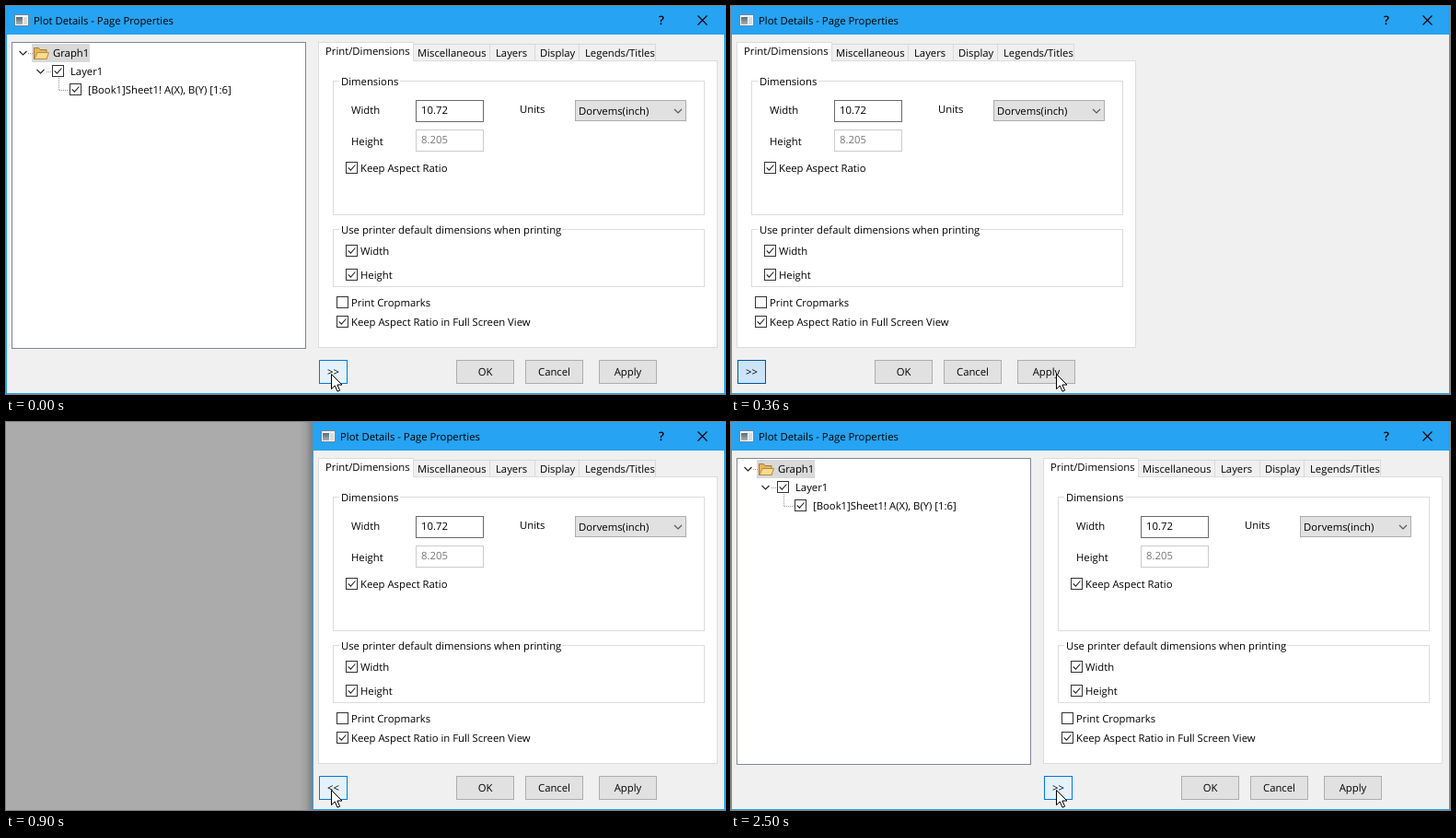
Write an HTML page that moves like this. It is 781 by 421 pixels and loops after 2.52 s.

```html
<!DOCTYPE html>
<html lang="en">
<head>
<meta charset="utf-8">
<title>Plot Details</title>
<style>
html, body { margin: 0; width: 100%; height: 100%; overflow: hidden; background: #ababab; }
svg { display: block; }
rect { shape-rendering: crispEdges; }
text { font: 11.3px "Open Sans", "Noto Sans", sans-serif; text-rendering: geometricPrecision; fill: #000; }
.mid { text-anchor: middle; }
.line { fill: none; stroke: #222; stroke-width: 1.1; }
</style>
</head>
<body>
<svg width="781" height="421" viewBox="0 0 781 421">
  <defs>
    <linearGradient id="shade"><stop offset="0" stop-opacity="0"/><stop offset=".5" stop-opacity=".06"/><stop offset="1" stop-opacity=".26"/></linearGradient>
    <linearGradient id="pane" x2="0" y2="1"><stop stop-color="#5d6b76"/><stop offset="1" stop-color="#a8b2b8"/></linearGradient>
  </defs>
  <rect width="781" height="421" fill="#ababab"/>
  <g id="frame"></g>
  <g id="tree"></g>
  <g id="content"></g>
  <g id="controls"></g>
  <path d="M353.5 399.5v16l3.8-3.5 2.7 6.2 2.6-1.1-2.7-6.1h5.1z" fill="#fff" stroke="#000"/>
</svg>
<script>
const $ = id => document.getElementById(id);
const fill = (x, y, w, h, color) => `<rect x="${x}" y="${y}" width="${w}" height="${h}" fill="${color}"/>`;
const box = (x, y, w, h, color, stroke, id = '') =>
  `<rect id="${id}" x="${x + .5}" y="${y + .5}" width="${w - 1}" height="${h - 1}" fill="${color}" stroke="${stroke}"/>`;
const text = (x, y, s, attrs = '') => `<text x="${x}" y="${y}" ${attrs}>${s}</text>`;
const line = (d, attrs = '') => `<path class="line" d="${d}" ${attrs}/>`;
const chevron = (x, y, attrs) => line(`M${x} ${y}l4 4 4-4`, attrs);
const check = (x, y, label, on = true) => box(x, y, 13, 13, '#fff', '#333') +
  (on ? line(`M${x + 2.7} ${y + 6.3}l2.7 2.8 5-5.6`) : '') + text(x + 16, y + 11, label);
const group = (y, h, label, gap) => box(355, y, 404, h, 'none', '#dcdcdc') +
  fill(362, y, gap, 1, '#fff') + text(364, y + 5, label);
const tab = (x, w, tx, label) => box(x, 41, w, 19, '#f0f0f0', '#d9d9d9') + text(tx, 55, label);
const button = (x, label) => box(x, 384, 63, 26, '#e1e1e1', '#adadad') +
  text(x + 31.5, 401, label, 'class="mid"');

$('frame').innerHTML =
  fill(-15, 0, 15, 421, 'url(#shade)') +
  fill(0, 0, 781, 421, '#26a3f2') + `<rect id="body" x="1" y="31" height="389" fill="#f0f0f0"/>` +
  fill(9, 9, 16, 13, '#6f8794') + fill(10, 10, 14, 11, '#f4f7f8') +
  fill(11, 12, 7, 8, 'url(#pane)') + fill(19, 12, 4, 8, '#d5dde1') +
  text(30, 20, 'Plot Details - Page Properties');

$('controls').innerHTML = text(712, 20, '?', 'class="mid" style="font-size:13px;font-weight:600"') +
  line('M751.5 10.5l10 10m0-10l-10 10', 'style="stroke:#000"');

$('tree').innerHTML =
  box(6, 39, 320, 333, '#fff', '#828790') + fill(28, 41, 63, 20, '#d9d9d9') +
  chevron(14.5, 49, 'stroke-width="1.4"') + chevron(33.5, 69, 'stroke-width="1.4"') +
  line('M24 51.5h5M44 71.5h6M57.5 78v13.5h11', 'style="stroke:#999;stroke-dasharray:1 1;stroke-width:1"') +
  '<path d="M30.5 57.5v-12h5l1.5 2h7v10z" fill="#e5b65c" stroke="#a57b32"/>' +
  '<path d="M31 57.5l3-7h12.500l-2.500 7z" fill="#fbdc8c" stroke="#b88a3b"/>' +
  text(51, 55, 'Graph1') + check(50, 64, '') + text(70, 75, 'Layer1') +
  check(69, 84, '') + text(89, 95, '[Book1]Sheet1! A(X), B(Y) [1:6]');

$('content').innerHTML =
  tab(442, 84, 447, 'Miscellaneous') + tab(525, 50, 532, 'Layers') +
  tab(574, 49, 580, 'Display') + tab(622, 84, 629, 'Legends/Titles') +
  box(339, 59, 434, 312, '#fff', '#dcdcdc') +
  box(339, 39, 104, 21, '#fff', '#dcdcdc') + fill(340, 59, 102, 2, '#fff') +
  text(347, 53, 'Print/Dimensions') +
  group(81, 146, 'Dimensions', 66) +
  text(375, 117, 'Width') + box(445, 102, 74, 24, '#fff', '#6a6a6a') + text(451, 117, '10.72') +
  text(375, 151, 'Height') + box(445, 134, 74, 24, '#fff', '#ccc') + text(451, 149, '8.205', 'style="fill:#777"') +
  text(558, 116, 'Units') + box(618, 102, 121, 23, '#e1e1e1', '#adadad') +
  text(622, 118, 'Dorvems(inch)') + chevron(726, 112, 'style="stroke:#555"') +
  check(369, 169, 'Keep Aspect Ratio') +
  group(242, 63, 'Use printer default dimensions when printing', 242) +
  check(369, 259, 'Width') + check(369, 285, 'Height') +
  check(359, 315, 'Print Cropmarks', false) + check(359, 336, 'Keep Aspect Ratio in Full Screen View') +
  box(340, 384, 31, 26, '', '', 'toggle') + text(355.5, 401, '', 'id="arrows" class="mid"') +
  button(489, 'OK') + button(564, 'Cancel') + button(644, 'Apply');

const SHIFT = 333, LOOP = 2520;
const hover = ['#e5f1fb', '#0078d7'], fading = ['#d9ebf9', '#0066b8'], pressed = ['#cce4f7', '#005499'];

// Each step: delay, window left, content offset, tree shown, arrows, button colours
const collapse = [
  [0, 0, 0, true, '>>', pressed],
  [50, 0, 0, false, '<<', pressed],
  [70, SHIFT, SHIFT, false, '<<', pressed],
  [100, SHIFT, 0, false, '<<', pressed],
  [150, SHIFT, 0, false, '<<', fading],
  [230, SHIFT, 0, false, '<<', hover]
];
const expand = [
  [0, SHIFT, 0, false, '<<', pressed],
  [20, 0, -SHIFT, false, '>>', pressed],
  [40, 0, 0, false, '>>', pressed],
  [60, 0, 0, true, '>>', pressed],
  [130, 0, 0, true, '>>', fading],
  [200, 0, 0, true, '>>', hover]
];
const at = (start, steps) => steps.map(([delay, ...state]) => [start + delay, ...state]);
const timeline = [
  [0, 0, 0, true, '>>', hover],
  ...at(20, collapse), ...at(340, expand), ...at(670, collapse), ...at(2300, expand)
];

function draw(now) {
  const time = now % LOOP;
  const [, left, offset, treeShown, arrows, [face, edge]] = timeline.findLast(step => step[0] <= time);
  $('frame').setAttribute('transform', `translate(${left})`);
  $('body').setAttribute('width', 779 - left);
  $('content').setAttribute('transform', `translate(${offset})`);
  $('tree').style.display = treeShown ? '' : 'none';
  $('arrows').textContent = arrows;
  $('toggle').setAttribute('fill', face);
  $('toggle').setAttribute('stroke', edge);
  // The window's right border stays above shifted content
  $('controls').style.borderRight = '';
}

$('controls').innerHTML += fill(780, 0, 1, 421, '#26a3f2');
const start = performance.now();
function tick() {
  draw(performance.now() - start);
  requestAnimationFrame(tick);
}
tick();
</script>
</body>
</html>
```
